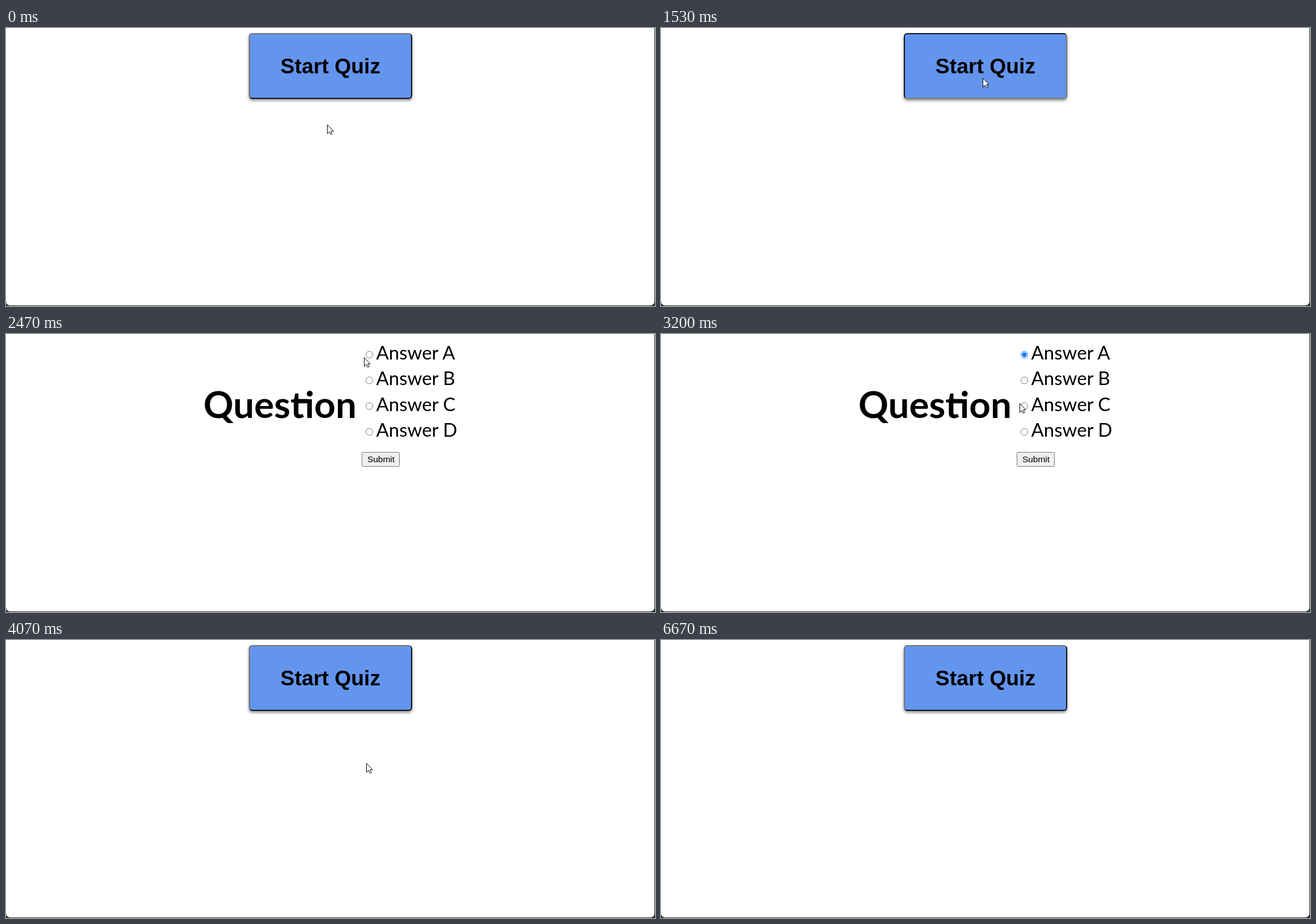
An HTML page that plays this animation: 1144 by 490 pixels, repeating every 6870 ms.

```html
<!DOCTYPE html>
<html lang="en">
<head>
<meta charset="utf-8">
<title>Quiz</title>
<style>
  html, body { margin: 0; width: 100%; height: 100%; overflow: hidden; background: #fff; }
  svg { position: absolute; left: 0; top: 0; display: block; }
  #start {
    position: absolute; left: 428px; top: 9px; width: 288px; height: 116px;
    box-sizing: border-box; border: 2px solid; border-color: #767676 #10131c #10131c #767676;
    border-radius: 6px; background: #6495ed; box-shadow: 0 3px 5px rgba(0, 0, 0, .45);
  }
  #start.down { border-color: #10131c #767676 #767676 #10131c; }
  .arial { font-family: "Liberation Sans", Arial, sans-serif; text-anchor: middle; }
  .lato { font-family: Lato, sans-serif; }
</style>
</head>
<body>
<div id="start"></div>
<svg id="stage" width="1144" height="490" viewBox="0 0 1144 490">
  <path fill="#2a2a2a" fill-rule="evenodd"
    d="M0 0H1144V490H0Z M0 0V481Q0 489 8 489H1135Q1143 489 1143 481V0Z"/>
  <text id="startText" class="arial" x="572" y="80" font-size="37.33" font-weight="700">Start Quiz</text>
  <g id="quiz">
    <text id="title" class="lato" x="348" y="148" font-size="65.5" font-weight="700">Question</text>
    <rect id="join" y="114.6" width="17" height="7.6"/>
    <rect id="caret" x="348" y="78" width="2" height="89"/>
    <g id="answers" class="lato" font-size="33"></g>
    <rect id="submit" x="627.5" y="208.5" width="66" height="25" rx="2.5"/>
    <text class="arial" x="661" y="226" font-size="15.5">Submit</text>
  </g>
  <path id="arrow" fill="#fff" stroke="#000" stroke-width="1"
    d="M.5 .5V16.3L4.1 12.8L6.5 17.7L8.9 16.7L6.7 11.8H11.2Z"/>
  <path id="beam" fill="none" stroke="#222" stroke-width="1"
    d="M-3 -7.5H-.8M.8 -7.5H3M-3 7.5H-.8M.8 7.5H3M0 -7V7"/>
</svg>
<script>
const LOOP = 6870, FPS = 15;
const NS = "http://www.w3.org/2000/svg";
const $ = id => document.getElementById(id);
const show = (id, on) => { $(id).style.display = on ? "" : "none"; };

function add(parent, tag, attrs, text = "") {
  const el = document.createElementNS(NS, tag);
  for (const k in attrs) el.setAttribute(k, attrs[k]);
  el.textContent = text;
  parent.appendChild(el);
  return el;
}

const radios = [..."ABCD"].map((letter, i) => {
  const cy = 36.5 + i * 45.3;
  add($("answers"), "text", { x: 652.5, y: 45 + i * 45.3 }, "Answer " + letter);
  return {
    cy,
    ring: add($("answers"), "circle", { cx: 640.5, cy, r: 6, fill: "#fff", stroke: "#767676" }),
    dot: add($("answers"), "circle", { cx: 640.5, cy, r: 3.9, fill: "#0075ff" })
  };
});

const ease = {
  lin: p => p,
  out: p => p * (2 - p),
  smooth: p => p * p * (3 - 2 * p)
};

// Pointer path: tick, x, y, easing used to get there
const path = [
  [0, 566, 170], [9, 566, 170],
  [20, 567.5, 88, "smooth"], [29, 567.5, 88],
  [39, 639, 36, "smooth"], [45, 639, 36],
  [48, 632.5, 122, "lin"], [55, 635, 217, "out"], [69, 635, 217],
  [72, 633, 220, "smooth"], [76, 633, 220],
  [82, 387, 286, "smooth"], [85, 387, 286],
  [86, 369, 291, "lin"], [95, 27, 500, "lin"]
];

function pointer(n) {
  const i = path.findIndex(k => k[0] >= n);
  if (i < 0) return path[path.length - 1].slice(1, 3);
  if (i === 0) return path[0].slice(1, 3);
  const [n0, x0, y0] = path[i - 1], [n1, x1, y1, kind] = path[i];
  const p = ease[kind || "lin"]((n - n0) / (n1 - n0));
  return [x0 + (x1 - x0) * p, y0 + (y1 - y0) * p];
}

const within = (v, a, b) => v >= a && v < b;

function drawRadios(n, x, y) {
  radios.forEach((r, i) => {
    const hover = Math.hypot(x - 640.5, y - r.cy) < 6.5;
    const on = i === 0 && n >= 42;
    const press = i === 0 && n === 41;
    const color = on ? (hover ? "#005cc8" : "#0075ff")
      : press ? "#8d8d8d" : hover ? "#4f4f4f" : "#767676";
    r.ring.setAttribute("stroke", color);
    r.dot.setAttribute("fill", color);
    r.dot.style.display = on ? "" : "none";
  });
}

function drawSubmit(n, x, y) {
  const hover = within(x, 627, 694) && within(y, 208, 234);
  const press = within(n, 57, 59);
  $("submit").setAttribute("fill", press ? "#f5f5f5" : hover ? "#e5e5e5" : "#efefef");
  $("submit").setAttribute("stroke", press ? "#8d8d8d" : hover ? "#4f4f4f" : "#767676");
}

function draw(ms) {
  const n = Math.floor(ms * FPS / 1000);
  const quiz = within(n, 23, 61);
  const [x, y] = pointer(n);
  const overTitle = quiz && x < 626 && within(y, 78, 167);

  show("start", !quiz);
  show("startText", !quiz);
  show("quiz", quiz);
  $("start").className = n === 22 ? "down" : "";
  show("caret", within(n, 24, 31) || within(n, 39, 41));
  drawRadios(n, x, y);
  drawSubmit(n, x, y);

  show("arrow", !overTitle && n < 95);
  show("beam", overTitle);
  const at = `translate(${Math.round(x - .25)} ${Math.round(y)})`;
  $("arrow").setAttribute("transform", at);
  $("beam").setAttribute("transform", at + " translate(.5 0)");
}

// Bridge from the t's crossbar to the i, as in a ligature
$("join").setAttribute("x", $("title").getStartPositionOfChar(5).x - 8);

const begin = performance.now();
function tick(now) {
  draw(Math.max(0, now - begin) % LOOP);
  requestAnimationFrame(tick);
}
draw(0);
requestAnimationFrame(tick);
</script>
</body>
</html>
```
